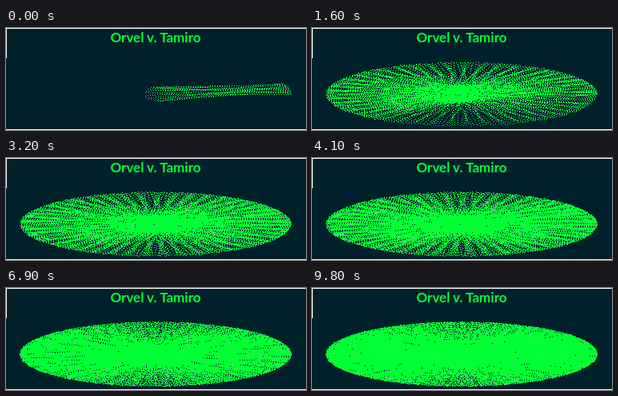
These frames come from a looping animation (375 px wide and 128 px high, 10000 ms). An HTML page with a canvas:

```html
<!DOCTYPE html>
<html lang="en">
<head>
<meta charset="utf-8">
<title>Orbit lines</title>
<style>
  html, body { margin: 0; width: 100%; height: 100%; overflow: hidden; background: #00212b; }
  #stage { position: relative; width: 375px; height: 128px; overflow: hidden; }
  canvas { position: absolute; left: 0; top: 0; }
  .edge { position: absolute; left: 0; width: 375px; height: 1px; background: #fff; }
  .top { top: 0; }
  .bottom { bottom: 0; }
  .side { top: 0; width: 1px; height: 38px; }
  h1 {
    position: absolute; left: 0; top: 2px; width: 374px; margin: 0;
    font: bold 17px/20px Lato, "Open Sans", sans-serif;
    text-align: center; color: #00ff33;
  }
</style>
</head>
<body>
<div id="stage">
  <canvas id="plot" width="375" height="128"></canvas>
  <div class="edge top"></div>
  <div class="edge bottom"></div>
  <div class="edge side"></div>
  <h1>Orvel v. Tamiro</h1>
</div>
<script>
const WIDTH = 375, HEIGHT = 128;
const LOOP = 10000, STEP = 100, LAST_STEP = 98;
const CENTER = { x: 186.5, y: 82.5 };
// Orbit radii in pixels and degrees turned from one line to the next.
const OUTER = { rx: 169.5, ry: 40.5, turn: 1.193 };
const INNER = { rx: 13, ry: 9, turn: OUTER.turn * 47.88 };
const FIRST_LINES = 17, LINES_PER_STEP = 30;
const DOT_GAP = 3, PALE_EVERY = 9;
const GREEN = 0xff33ff00, PALE = 0xffc8b4b4;

const ctx = document.getElementById("plot").getContext("2d");
const image = ctx.createImageData(WIDTH, HEIGHT);
const pixels = new Uint32Array(image.data.buffer);
let drawnLines = 0;

function orbitPoint(orbit, index) {
  const angle = index * orbit.turn * Math.PI / 180;
  return {
    x: CENTER.x + orbit.rx * Math.cos(angle),
    y: CENTER.y - orbit.ry * Math.sin(angle)
  };
}

function drawLine(index) {
  const from = orbitPoint(INNER, index);
  const to = orbitPoint(OUTER, index);
  const dx = to.x - from.x, dy = to.y - from.y;
  const length = Math.hypot(dx, dy);
  for (let d = 0, dot = 0; d <= length; d += DOT_GAP, dot++) {
    const x = Math.round(from.x + dx * d / length);
    const y = Math.round(from.y + dy * d / length);
    const at = y * WIDTH + x;
    // Pale dots never cover green ones.
    if ((dot + index) % PALE_EVERY) pixels[at] = GREEN;
    else if (!pixels[at]) pixels[at] = PALE;
  }
}

function render(time) {
  const step = Math.min(LAST_STEP, Math.floor(time % LOOP / STEP));
  const lines = FIRST_LINES + step * LINES_PER_STEP;
  if (lines === drawnLines) return;
  if (lines < drawnLines) {
    pixels.fill(0);
    drawnLines = 0;
  }
  while (drawnLines < lines) drawLine(drawnLines++);
  ctx.putImageData(image, 0, 0);
}

const start = performance.now();
function tick() {
  render(performance.now() - start);
  requestAnimationFrame(tick);
}
tick();
</script>
</body>
</html>
```
